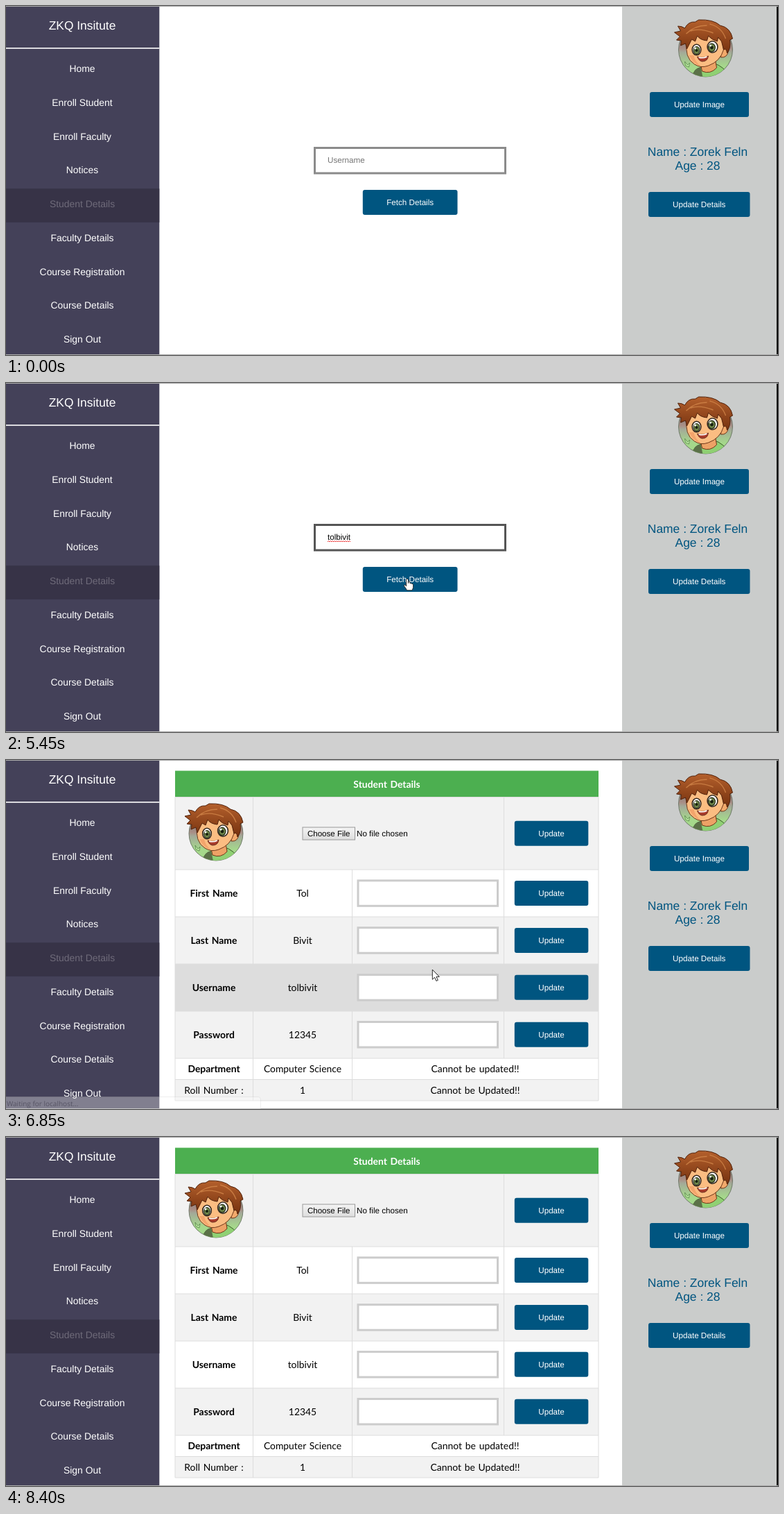
Write an HTML page that moves like this. It is 1114x503 px and loops after 9070 ms.

```html
<!DOCTYPE html>
<html lang="en">
<head>
<meta charset="utf-8">
<title>Student details</title>
<style>
  html, body { margin: 0; width: 100%; height: 100%; overflow: hidden; background: #fff; }
  svg { display: block; width: 100%; height: 100%; }
  text { font-family: "Liberation Sans", Arial, sans-serif; text-rendering: geometricPrecision; white-space: pre; }
  .grid { font-family: Lato, sans-serif; font-size: 13.9px; word-spacing: .09em; }
  .bold { font-weight: 700; }
  .status { font-family: "Open Sans", sans-serif; }
</style>
</head>
<body>
<svg id="stage" viewBox="0 0 1114 503" preserveAspectRatio="none"></svg>
<script>
const LOOP = 9070;
const BLUE = '#005580';
const stage = document.getElementById('stage');

const rect = (x, y, w, h, fill, more = '') =>
  `<rect x="${x}" y="${y}" width="${w}" height="${h}" fill="${fill}" ${more}/>`;
const label = (s, x, y, size, fill = '#000', more = 'text-anchor="middle"') =>
  `<text x="${x}" y="${y}" font-size="${size}" fill="${fill}" ${more}>${s}</text>`;
const cell = (s, x, y, bold, fill = '#000') =>
  `<text class="grid${bold ? ' bold' : ''}" x="${x}" y="${y}" fill="${fill}" text-anchor="middle">${s}</text>`;
const line = (x1, y1, x2, y2) => `<path d="M${x1} ${y1}L${x2} ${y2}" stroke="#ddd"/>`;
const button = (s, x, y, w) =>
  rect(x, y, w, 36, BLUE, 'rx="3"') + label(s, x + w / 2, y + 22.1, 11.65, '#fff');
const field = (x, y, w, id = '') =>
  rect(x + 1.5, y + 1.5, w - 3, 36.5, '#fff', `stroke="#ccc" stroke-width="3" ${id}`);
const avatar = (x, y) => `<use href="#avatar" x="${x}" y="${y}"/>`;

const defs = `<defs>
  <linearGradient id="sky" x2="0" y2="1">
    <stop offset=".2" stop-color="#77736f"/><stop offset=".48" stop-color="#a98f87"/>
    <stop offset=".55" stop-color="#a3aa98"/><stop offset=".8" stop-color="#a5d88b"/>
  </linearGradient>
  <linearGradient id="hair" x2="0" y2="1">
    <stop offset="0" stop-color="#b4602c"/><stop offset="1" stop-color="#75310f"/>
  </linearGradient>
  <linearGradient id="grey" x2="0" y2="1">
    <stop offset="0" stop-color="#f4f4f4"/><stop offset="1" stop-color="#ddd"/>
  </linearGradient>
  <clipPath id="disc"><circle r="39"/></clipPath>
  <g id="avatar" stroke-linejoin="round">
    <circle r="39" fill="url(#sky)" stroke="#5b6656" stroke-width=".8"/>
    <g clip-path="url(#disc)">
      <path d="M-19 40Q-18 27-5 25L10 19Q29 24 33 40Z" fill="#8fd073" stroke="#3d5a2c"/>
      <path d="M-19 40Q-18 27-7 25L-4 40Z" fill="#5b7148"/>
      <path d="M-7 22L14 14L16 26Q7 36-5 31Z" fill="#eda266" stroke="#6d3719"/>
      <path d="M-30 17l4 5 3-3-1 6-5-2z" fill="#b9e6a0" stroke="#4d7a41" stroke-width=".7"/>
    </g>
    <path d="M23-2Q32-9 33 2Q31 12 22 11Z" fill="#f2aa6c" stroke="#6d3719"/>
    <path d="M-27-14Q-31 12-16 21Q-7 27 4 23Q21 17 26 0L23-21Q0-32-27-14Z" fill="#fbbd82" stroke="#6d3719"/>
    <path d="M-24 8Q-18 20-7 24Q-16 16-17 8Z" fill="#f09a62" opacity=".7"/>
    <g fill="#fff" stroke="#31261c" stroke-width="1.6">
      <ellipse cx="-13" cy="0" rx="6.3" ry="7.8"/><ellipse cx="10" cy="-4" rx="7.4" ry="8.2"/>
    </g>
    <g fill="#718a4c" stroke="#2e351e" stroke-width="1.4">
      <ellipse cx="-13" cy="1" rx="4.2" ry="5.4"/><ellipse cx="9" cy="-3" rx="4.8" ry="5.7"/>
    </g>
    <g fill="#182010"><circle cx="-13" cy="1" r="2.1"/><circle cx="9" cy="-3" r="2.4"/></g>
    <g fill="#fff"><circle cx="-15" cy="-2" r="1.4"/><circle cx="7" cy="-6" r="1.6"/></g>
    <path d="M-12 10Q-5 13 4 9Q3 17-5 17Q-10 16-12 10Z" fill="#a83a2a" stroke="#542115" stroke-width=".8"/>
    <path d="M-10 11Q-4 13 2 10" stroke="#fff" stroke-width="1.5" fill="none"/>
    <path d="M-27-1L-29-9L-36-6L-35-13L-42-14L-37-19L-45-25L-36-27L-40-34Q-34-34-30-31Q-25-41-15-40L-10-43Q11-44 21-35Q36-32 39-16L35-14Q37-2 31 5Q30-3 26 0L23-12L18-18L17-12Q9-14 4-20L2-13Q-8-14-12-20L-15-12L-20-15Z" fill="url(#hair)" stroke="#50220c"/>
    <path d="M-28-23Q-16-35 2-35M-22-27Q-8-32 11-24M6-37Q23-33 29-16" fill="none" stroke="#d68a4c" stroke-width="1.4" opacity=".75"/>
  </g>
</defs>`;

const MENU = ['Home', 'Enroll Student', 'Enroll Faculty', 'Notices', 'Student Details',
  'Faculty Details', 'Course Registration', 'Course Details', 'Sign Out'];

const sidebar = rect(0, 0, 221.3, 503, '#444159') + rect(0, 60, 221.3, 1.6, '#fff') +
  rect(0, 263.2, 221.3, 48.7, '#373347') +
  label('ZKQ Insitute', 110, 33.6, 17.4, '#fff') +
  MENU.map((s, i) => label(s, 110, 95.2 + 48.73 * i, 13.9, i === 4 ? '#6f6b7a' : '#fff')).join('');

const profile = rect(889, 0, 223, 503, '#cacccb') + rect(1112, 0, 2, 503, '#111') +
  avatar(1009.5, 63) + button('Update Image', 929, 124, 143) +
  label('Name : Zorek Feln', 998, 216, 17.45, BLUE) +
  label('Age : 28', 998, 235.8, 17.45, BLUE) +
  button('Update Details', 927, 268, 146.5);

const search = `<g id="search">${field(444, 203, 278, 'id="box"')}
  <text id="typed" x="464" y="226.3" font-size="11.65"></text>
  <path id="wavy" d="M464 229${'l1.5 -1.5l1.5 1.5'.repeat(11)}" fill="none" stroke="#e33" stroke-width="1"/>
  ${rect(464, 217, 1, 12, '#000', 'id="caret"')}
  ${button('Fetch Details', 514.8, 265, 136.7)}</g>`;

// Table rows below the header: edges, then contents
const EDGES = [53.5, 158, 226, 294, 362, 430, 460.5, 491];
const ENTRIES = [['First Name', 'Tol'], ['Last Name', 'Bivit'], ['Username', 'tolbivit'], ['Password', '12345']];

function table() {
  let out = rect(244, 15.5, 611, 38, '#4caf50') + cell('Student Details', 549.5, 39.8, true, '#fff');
  for (let i = 0; i < 7; i++)
    out += rect(244, EDGES[i], 611, EDGES[i + 1] - EDGES[i], '#fff', 'class="row"');
  for (const y of EDGES) out += line(244, y, 855, y);
  out += line(244, 53.5, 244, 491) + line(855, 53.5, 855, 491) + line(356.5, 53.5, 356.5, 491) +
    line(499.5, 158, 499.5, 491) + line(718.5, 53.5, 718.5, 430);
  out += avatar(303, 106) + rect(428, 97, 75.5, 18, 'url(#grey)', 'stroke="#999"') +
    label('Choose File', 465.7, 109.6, 11.55) +
    label('No file chosen', 506, 109.6, 11.65, '#000', '') + button('Update', 733.8, 87.7, 106.5);
  ENTRIES.forEach(([name, value], i) => {
    const y = 192 + 67.9 * i;
    out += cell(name, 300, y + 5, true) + cell(value, 428, y + 5) +
      field(506.5, y - 19.7, 204.5) + button('Update', 733.8, y - 18, 106.5);
  });
  return out + cell('Department', 300, 450.3, true) + cell('Computer Science', 428, 450.3) +
    cell('Cannot be updated!!', 677, 450.3) + cell('Roll Number :', 300, 481) +
    cell('1', 428, 481) + cell('Cannot be Updated!!', 677, 481);
}

const status = `<g id="status"><path d="M-1 485.5H364Q367.5 485.5 367.5 489V504H-1Z" fill="#fff" stroke="#ccc"/>
  <text class="status" x="1" y="498.5" font-size="10" fill="#777">Waiting for localhost...</text></g>`;

const pointers = `<g id="pointer">
  <path d="M0 0V14.2L3.3 11.2L5.6 16.4L8 15.3L5.7 10.3H10Z" fill="#fff" stroke="#111" stroke-width=".9"/>
  <path d="M-4-7.5H-1.2L0-6.5L1.2-7.5H4M0-6.5V6.5M-4 7.5H-1.2L0 6.5L1.2 7.5H4" fill="none" stroke="#111" stroke-width="1.4"/>
  <path d="M-1.4 1.2Q0-1 1.4 1.2V6.5Q3-.0 4.2 7Q5.7 5.6 6.6 7.6Q8.3 6.6 8.6 8.8V12.5Q8 15 7 16.8H-.4Q-2.2 13.4-4.5 10.5Q-5.2 8.4-3.2 9L-1.4 10.8Z" fill="#fff" stroke="#222" stroke-width=".9"/>
</g>`;

stage.innerHTML = defs + rect(0, 0, 1114, 503, '#fff') + sidebar + profile + search +
  `<g id="table">${table()}</g>` + rect(0, 0, 1114, 1, '#aaa') + rect(0, 502, 1114, 1, '#aaa') +
  status + pointers;

const el = id => document.getElementById(id);
const [box, typed, wavy, caret, searchPage, tablePage, bubble, pointer] =
  ['box', 'typed', 'wavy', 'caret', 'search', 'table', 'status', 'pointer'].map(el);
const rows = [...document.querySelectorAll('.row')];
const show = (node, on) => node.setAttribute('visibility', on ? 'inherit' : 'hidden');
const clamp = v => Math.max(0, Math.min(1, v));

// CSS "ease": cubic-bezier(.25, .1, .25, 1)
function ease(p) {
  p = clamp(p);
  let lo = 0, hi = 1, u;
  for (let i = 0; i < 20; i++) {
    u = (lo + hi) / 2;
    if (.75 * u * (1 - u) + u ** 3 < p) lo = u; else hi = u;
  }
  return .3 * u * (1 - u) ** 2 + 3 * u * u * (1 - u) + u ** 3;
}

const FOCUS = 1190, CLICK = 5450, LOADED = 6630, MOVED = 6750;
const KEYS = [2020, 2140, 2290, 2830, 2880, 3230, 3440, 3650];
const PATH = [[20, 1022, 490], [500, 545, 179], [640, 545, 179], [1150, 507, 216], [4900, 507, 216],
  [5400, 579, 282], [MOVED, 579, 282], [7070, 733, 367], [7450, 740, 372], [7570, 744, 374], [8400, 1064, 503]];

function place(t) {
  const i = Math.max(1, PATH.findIndex(k => k[0] > t));
  const [a, b] = [PATH[i - 1], PATH[i]];
  const p = clamp((t - a[0]) / (b[0] - a[0]));
  const e = p * p * (3 - 2 * p);
  return [a[1] + (b[1] - a[1]) * e, a[2] + (b[2] - a[2]) * e];
}

const inside = (x, y, l, top, w, h) => x >= l && x <= l + w && y >= top && y <= top + h;

function shape(t, x, y) {
  if (t < LOADED) {
    if (inside(x, y, 444, 203, 278, 39.5)) return 1;
    return inside(x, y, 515, 265, 136.5, 36) ? 2 : 0;
  }
  if (t < MOVED) return 2;
  for (let i = 0; i < 4; i++) {
    const top = 172.3 + 67.9 * i;
    if (inside(x, y, 506.5, top, 204.5, 39.5)) return 1;
    if (inside(x, y, 733.8, top + 1.7, 106.5, 36)) return 2;
  }
  return 0;
}

function draw(t) {
  const loaded = t >= LOADED;
  show(searchPage, !loaded);
  show(tablePage, loaded);

  const focus = t < FOCUS ? 1 - ease((t + 135) / 500)
    : t < CLICK ? ease((t - FOCUS) / 500) : 1 - ease((t - CLICK) / 500);
  const g = Math.round(204 - 119 * focus);
  box.setAttribute('stroke', `rgb(${g},${g},${g})`);

  const count = KEYS.filter(k => t >= k).length;
  typed.textContent = count ? 'tolbivit'.slice(0, count) : 'Username';
  typed.setAttribute('fill', count ? '#000' : '#757575');
  caret.setAttribute('x', 464 + (count && !loaded ? typed.getComputedTextLength() : 0));
  const blink = t >= FOCUS && t < 1760 || t >= 2020 && t < 4240 || t >= 4900 && t < 5400;
  show(caret, !loaded && blink);
  show(wavy, !loaded && t >= CLICK);

  bubble.setAttribute('opacity', t < 5850 ? 0 : t < MOVED ? clamp(.5 + (t - 5850) / 240) : clamp(1 - (t - MOVED) / 150));

  const [x, y] = place(Math.min(t, 8399));
  const kind = shape(t, x, y);
  show(pointer, t >= 20 && t < 8400);
  pointer.setAttribute('transform', `translate(${x.toFixed(1)} ${y.toFixed(1)})`);
  [...pointer.children].forEach((node, i) => show(node, i === kind));

  rows.forEach((row, i) => {
    const over = t >= MOVED && t < 8400 && inside(x, y, 244, EDGES[i], 611, EDGES[i + 1] - EDGES[i]);
    row.setAttribute('fill', over ? '#ddd' : i % 2 ? '#fff' : '#f2f2f2');
  });
}

const start = performance.now();
function tick() {
  draw((performance.now() - start) % LOOP);
  requestAnimationFrame(tick);
}
tick();
</script>
</body>
</html>
```
